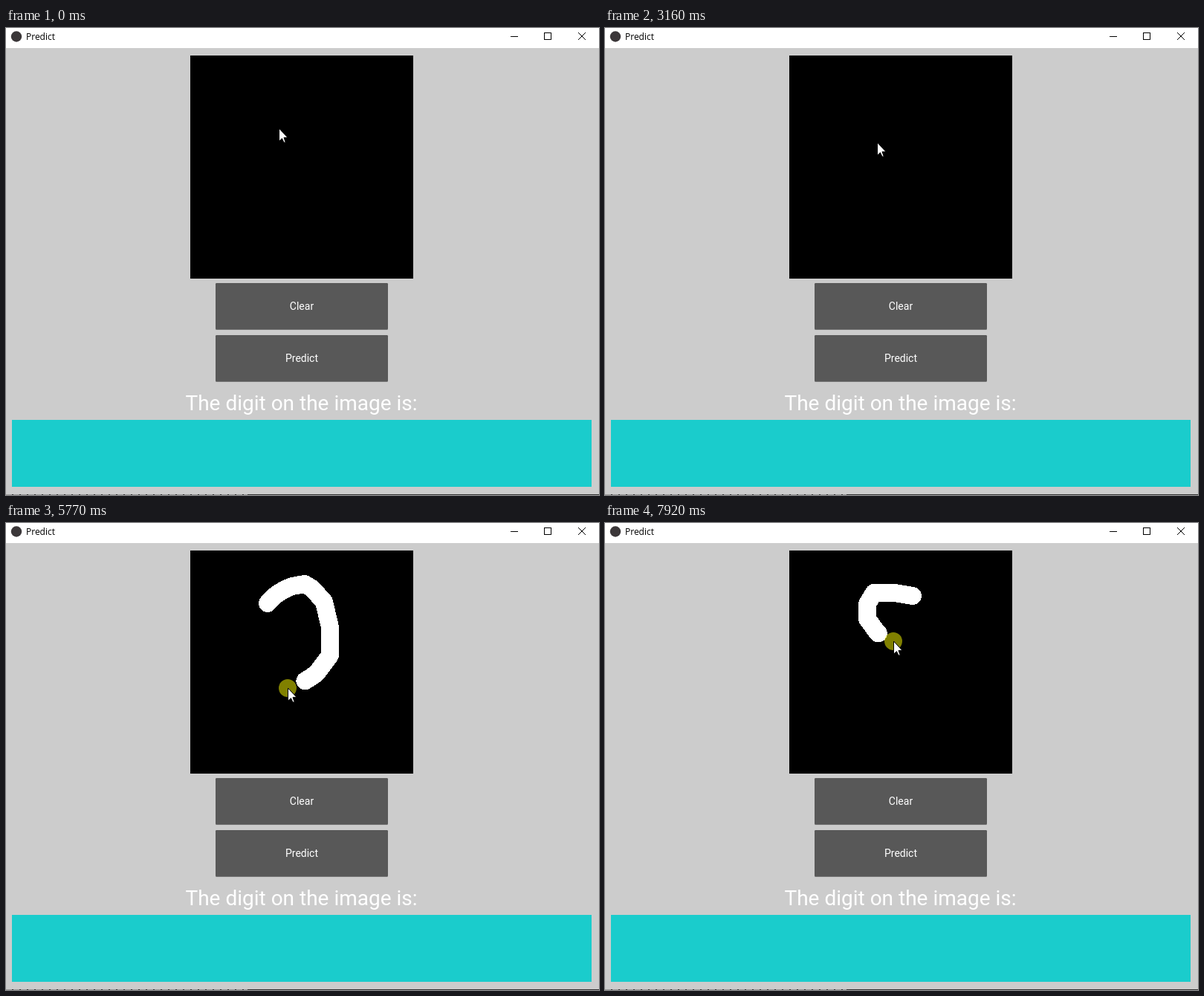
An HTML page for the animation above (8000 ms loop, 798x628 px).

```html
<!DOCTYPE html>
<html lang="en">
<head>
<meta charset="utf-8">
<title>Predict</title>
<style>
  html, body { margin: 0; width: 100%; height: 100%; overflow: hidden; background: #ccc; }
  svg { display: block; }
  text { font-family: Roboto, sans-serif; fill: #fff; text-anchor: middle; }
  .crisp, #ink { shape-rendering: crispEdges; }
</style>
</head>
<body>
<svg width="798" height="628" viewBox="0 0 798 628">
  <rect width="798" height="628" fill="#ccc"/>

  <rect width="798" height="27" fill="#fff"/>
  <circle cx="14" cy="11.5" r="7.2" fill="#3b3739"/>
  <text x="27" y="16" style="font: 12px 'Open Sans', sans-serif; fill: #000; text-anchor: start">Predict</text>
  <g fill="none" stroke="#000">
    <path class="crisp" d="M679 11.5h10M724.5 6.5h9v9h-9z"/>
    <path d="M770 6l10 10M780 6l-10 10"/>
  </g>

  <rect x="248" y="37" width="300" height="300"/>
  <g id="ink" fill="none" stroke="#fff" stroke-width="24" stroke-linecap="round" stroke-linejoin="round"/>

  <g font-size="14">
    <rect x="282" y="343" width="232" height="63" rx="1.5" fill="#757575"/>
    <rect id="clear" x="282" y="343" width="232" height="62" rx="1.5"/>
    <text x="398" y="379">Clear</text>
    <rect x="282" y="413" width="232" height="63" rx="1.5" fill="#757575"/>
    <rect id="predict" x="282" y="413" width="232" height="62" rx="1.5"/>
    <text x="398" y="449">Predict</text>
  </g>

  <text x="397.5" y="514" font-size="28">The digit on the image is:</text>
  <rect x="8" y="527" width="780" height="90" fill="#1acccc"/>
  <text id="result" x="398" y="596" font-size="70"></text>

  <path d="M0 627.5h798" stroke="#333"/>
  <path d="M0 627.5h325" stroke="#999" stroke-dasharray="8 2"/>

  <g id="pointer">
    <circle id="halo" r="12" fill="#ff0" fill-opacity=".5"/>
    <path d="M.5 0V17.2L4.4 13.6L7 19H9.3L7 12.4H12Z" fill="#fff" stroke="#000"/>
  </g>
</svg>
<script>
const LOOP = 8000, ORIGIN = 520, TICK = 77.08;   // ms
const PREDICT_Y = 442, CLEAR_Y = 372;
const $ = id => document.getElementById(id);
const clamp = u => Math.min(1, Math.max(0, u));
const smooth = u => u * u * (3 - 2 * u);
const mix = (a, b, u) => a + (b - a) * u;

// Times are in ticks. Every action moves the pointer from start to end; at(u) is its place.
function pen(start, end, d) {
  const path = document.createElementNS("http://www.w3.org/2000/svg", "path");
  path.setAttribute("d", d);
  $("ink").append(path);
  const length = path.getTotalLength();
  const at = u => { const p = path.getPointAtLength(u * length); return [p.x, p.y]; };
  return { start, end, at, path, length, active: true };
}
const press = (start, x, y) => ({ start, end: start + 1, at: () => [x, y], active: true });

function round(digit, x, predictAt, clearAt, ...pens) {
  return { digit, pens, predict: press(predictAt, x, PREDICT_Y), clear: press(clearAt, x, CLEAR_Y) };
}

const rounds = [
  round("5", 400, 24, 29,
    pen(0, 9.3, "M367 104V181L402 176H417L425 178 441 191 442 211 433 227 414 243"),
    pen(10, 13, "M414 243Q390 252 357 247"),
    pen(16, 21, "M367 103L481 100")),
  round("7", 400, 48, 54,
    pen(35.5, 43, "M358 105H473L443 150 408 208 403 222 381 271")),
  round("2", 418, 80, 84,
    pen(58.7, 74, "M352 108Q362 94 385 85L402 82 412 88 428 106 436 140V178L418 202" +
                  "Q400 216 380 222L345 231Q337 234 337 244L350 251 402 254Q422 256 435 270")),
  round("", 400, Infinity, Infinity,
    pen(90, 96, "M414 98L390 94H362L353 109V129L367 148 388 159")),
];
const drift = { start: -5, end: -1, at: u => [367, mix(135, 116, clamp(2 * u))] };
const actions = [drift, ...rounds.flatMap(r => [...r.pens, r.predict, r.clear])]
  .sort((a, b) => a.start < b.start ? -1 : 1);

const during = (action, tick) => tick >= action.start && tick <= action.end;
const progress = (action, tick) => clamp((tick - action.start) / (action.end - action.start));

function pointerAt(tick) {
  const next = actions.findIndex(a => a.start > tick);
  const last = actions[next - 1], following = actions[next];
  if (tick <= last.end || following.start === Infinity) return last.at(progress(last, tick));
  const u = smooth((tick - last.end) / (following.start - last.end));
  const from = last.at(1), to = following.at(0);
  return [mix(from[0], to[0], u), mix(from[1], to[1], u)];
}

function render(now) {
  const tick = Math.max(drift.start, Math.floor((now % LOOP - ORIGIN) / TICK + 0.1));

  // Ink trails the pointer by one tick and stays until Clear is released.
  for (const { pens, clear } of rounds) {
    for (const p of pens) {
      const visible = tick > p.start && tick <= clear.end;
      p.path.setAttribute("visibility", visible ? "visible" : "hidden");
      p.path.setAttribute("stroke-dasharray", `${progress(p, tick - 1) * p.length} ${p.length + 1}`);
    }
  }

  const shown = rounds.find(r => tick > r.predict.end && tick <= r.clear.end);
  $("result").textContent = shown ? shown.digit : "";
  for (const name of ["predict", "clear"]) {
    const held = rounds.some(r => during(r[name], tick));
    $(name).setAttribute("fill", held ? "#32a4ce" : "#585858");
  }

  const clicking = actions.some(a => a.active && during(a, tick));
  $("halo").setAttribute("visibility", clicking ? "visible" : "hidden");
  const [x, y] = pointerAt(tick).map(Math.round);
  $("pointer").setAttribute("transform", `translate(${x} ${y})`);
  requestAnimationFrame(render);
}
render(performance.now());
</script>
</body>
</html>
```
